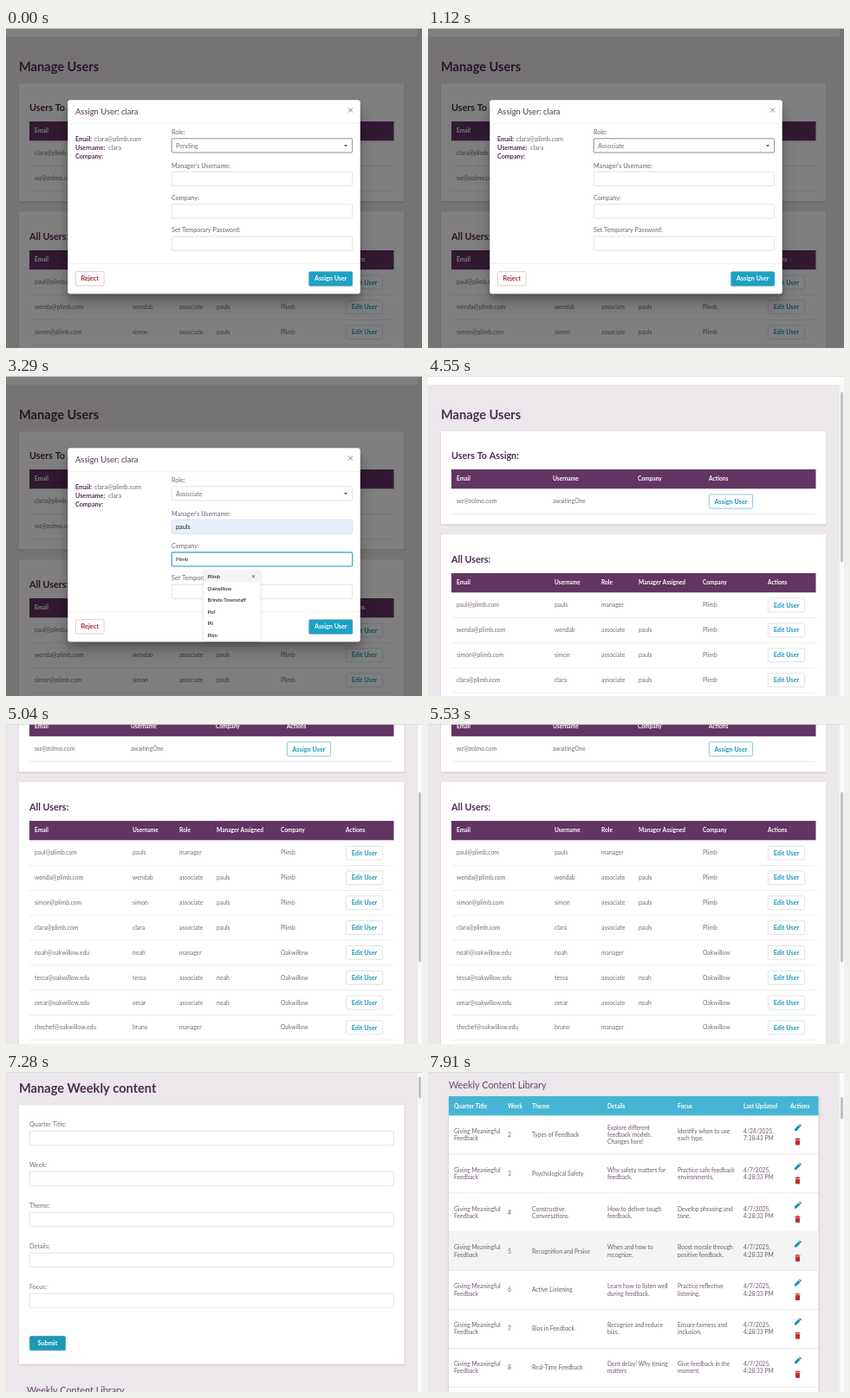
An HTML page with a canvas that plays this animation: 480x370 px, repeating every 8 s.

```html
<!DOCTYPE html>
<html lang="en">
<head>
<meta charset="utf-8">
<title>Manage Users</title>
<style>
html, body { margin: 0; width: 100%; height: 100%; overflow: hidden; background: #ebe7ea; }
canvas { display: block; width: 480px; height: 370px; }
</style>
</head>
<body>
<canvas id="stage"></canvas>
<script>
const W = 480, H = 370, LOOP = 8000;
const canvas = document.getElementById('stage');
const ctx = canvas.getContext('2d');
const dpr = Math.max(1, window.devicePixelRatio || 1);
canvas.width = W * dpr;
canvas.height = H * dpr;

const PINK = '#ebe7ea', PURPLE = '#623562', DARK = '#4f2c51', GRAY = '#786b78';
const TEAL = '#1f98b8', SOFT_TEAL = '#69b7cc', LINE = '#e9e6e9', AUTOFILL = '#e8f0fe';

const pending = [
  ['clara@plimb.com', 'clara', ''],
  ['wz@zolmo.com', 'awaitingOne', '']
];
const users = [
  ['paul@plimb.com', 'pauls', 'manager', '', 'Plimb'],
  ['wenda@plimb.com', 'wendab', 'associate', 'pauls', 'Plimb'],
  ['simon@plimb.com', 'simon', 'associate', 'pauls', 'Plimb'],
  ['clara@plimb.com', 'clara', 'associate', 'pauls', 'Plimb'],
  ['noah@oakwillow.edu', 'noah', 'manager', '', 'Oakwillow'],
  ['tessa@oakwillow.edu', 'tessa', 'associate', 'noah', 'Oakwillow'],
  ['omar@oakwillow.edu', 'omar', 'associate', 'noah', 'Oakwillow'],
  ['thechef@oakwillow.edu', 'bruno', 'manager', '', 'Oakwillow']
];
const managers = ['pauls', 'noah', 'blueberry', 'melodia', 'joannet', 'adas'];
const companies = ['Plimb', 'Oakwillow', 'Brindo Townstaff', 'Pof', 'Pli', 'Plim'];
const lessons = [
  ['Types of Feedback', 'Explore different|feedback models.|Changes here!', 'Identify when to use|each type.'],
  ['Psychological Safety', 'Why safety matters for|feedback.', 'Practice safe feedback|environments.'],
  ['Constructive|Conversations', 'How to deliver tough|feedback.', 'Develop phrasing and|tone.'],
  ['Recognition and Praise', 'When and how to|recognize.', 'Boost morale through|positive feedback.'],
  ['Active Listening', 'Learn how to listen well|during feedback.', 'Practice reflective|listening.'],
  ['Bias in Feedback', 'Recognize and reduce|bias.', 'Ensure fairness and|inclusion.'],
  ['Real-Time Feedback', 'Dont delay! Why timing|matters', 'Give feedback in the|moment.']
];

const span = (t, a, b) => Math.min(1, Math.max(0, (t - a) / (b - a)));
const easeOut = p => 1 - (1 - p) ** 3;
const easeInOut = p => p * p * (3 - 2 * p);

function rect(x, y, w, h, color) {
  ctx.fillStyle = color;
  ctx.fillRect(x, y, w, h);
}

function box(x, y, w, h, r, fill, stroke, lineWidth = 0.7) {
  ctx.beginPath();
  ctx.roundRect(x, y, w, h, r);
  if (fill) { ctx.fillStyle = fill; ctx.fill(); }
  if (stroke) { ctx.strokeStyle = stroke; ctx.lineWidth = lineWidth; ctx.stroke(); }
}

// y is the visual middle of the line
function text(str, x, y, size, color, weight = 400, align = 'left') {
  ctx.font = `${weight} ${size}px Lato, sans-serif`;
  ctx.textAlign = align;
  ctx.fillStyle = color;
  ctx.fillText(str, x, y + size * 0.36);
}

function lines(str, x, y, size, color) {
  const parts = str.split('|');
  parts.forEach((s, i) => text(s, x, y + (i - (parts.length - 1) / 2) * 8.4, size, color));
}

function shadowed(blur, dy, alpha, draw) {
  ctx.save();
  ctx.shadowColor = `rgba(0,0,0,${alpha})`;
  ctx.shadowBlur = blur * dpr;
  ctx.shadowOffsetY = dy * dpr;
  draw();
  ctx.restore();
}

function card(y, h) {
  shadowed(1.5, 0.8, 0.2, () => box(15, y, 444.5, h, 1, '#fff'));
}

function button(label, x, y, w, h, color, border, fill = '#fff') {
  box(x + 0.4, y + 0.4, w - 0.8, h - 0.8, 1.5, fill, border);
  text(label, x + w / 2, y + h / 2, 7.3, color, 700, 'center');
}

function cross(x, y, r, color) {
  ctx.strokeStyle = color;
  ctx.lineWidth = 0.8;
  ctx.beginPath();
  ctx.moveTo(x - r, y - r); ctx.lineTo(x + r, y + r);
  ctx.moveTo(x + r, y - r); ctx.lineTo(x - r, y + r);
  ctx.stroke();
}

function tableHead(y, labels, xs) {
  rect(27, y, 420.5, 22.3, PURPLE);
  labels.forEach((s, i) => text(s, xs[i], y + 11, 6.6, '#fff', 700));
}

function navBar(active) {
  rect(0, 0, 475, 42, '#fff');
  ctx.fillStyle = '#c9b24b';
  ctx.beginPath();
  ctx.arc(43, 21, 9.5, 0, Math.PI * 2);
  ctx.fill();
  const links = ['Manage Users', 'Manage Weekly content', 'Pair Assignments', "Lou's Account"];
  [175, 230, 314, 376].forEach((x, i) => {
    const on = i === active;
    text(links[i], x, 21.5, 7.2, on ? TEAL : SOFT_TEAL, on ? 700 : 400);
    if (on) rect(x, 25.2, ctx.measureText(links[i]).width, 0.7, TEAL);
  });
  button('Log Out', 428, 13, 39, 17, TEAL, '#c3dce3');
}

function usersPage(assigned) {
  navBar(0);
  text('Manage Users', 15, 76.3, 14.6, DARK, 700);

  const queue = assigned ? pending.slice(1) : pending;
  card(96, 78.5 + 29 * queue.length);
  text('Users To Assign:', 27, 123.7, 10.8, DARK, 700);
  const queueX = [33, 144, 242, 324];
  tableHead(140, ['Email', 'Username', 'Company', 'Actions'], queueX);
  queue.forEach((row, i) => {
    const y = 177 + 29 * i;
    row.forEach((s, c) => text(s, queueX[c], y, 6.8, GRAY));
    button('Assign User', 324, y - 8.5, 51, 17, TEAL, '#55b4cb');
    rect(27, y + 14.2, 420.5, 0.7, LINE);
  });

  const top = 186 + 29 * queue.length;
  card(top, 480);
  text('All Users:', 27, top + 28.7, 10.8, DARK, 700);
  const userX = [33, 146, 200, 243, 317, 392];
  tableHead(top + 45, ['Email', 'Username', 'Role', 'Manager Assigned', 'Company', 'Actions'], userX);
  users.filter(u => assigned || u[1] !== 'clara').forEach((row, i) => {
    const y = top + 82 + 28.85 * i;
    row.forEach((s, c) => text(s, userX[c], y, 6.8, GRAY));
    button('Edit User', 392, y - 8.3, 43, 16.6, TEAL, '#c8dde2');
    rect(27, y + 14.2, 420.5, 0.7, LINE);
  });
}

function pencil(x, y) {
  ctx.save();
  ctx.translate(x, y);
  ctx.rotate(Math.PI / 4);
  ctx.fillStyle = '#1b93b1';
  ctx.beginPath();
  ctx.moveTo(-1.5, -2.9); ctx.lineTo(1.5, -2.9); ctx.lineTo(1.5, 3.2);
  ctx.lineTo(0, 5.2); ctx.lineTo(-1.5, 3.2);
  ctx.fill();
  box(-1.5, -5, 3, 1.5, 0.5, '#1b93b1');
  ctx.restore();
}

function trash(x, y) {
  const red = '#bd2f2f';
  rect(x - 3, y - 3.6, 6, 1.1, red);
  rect(x - 1.2, y - 4.2, 2.4, 0.8, red);
  box(x - 2.5, y - 2, 5, 6, 0.8, red);
}

function weeklyPage(hover) {
  navBar(1);
  text('Manage Weekly content', 15, 76.3, 14.6, DARK, 700);
  card(96, 300);
  ['Quarter Title:', 'Week:', 'Theme:', 'Details:', 'Focus:'].forEach((s, i) => {
    const y = 118 + 47 * i;
    text(s, 27, y, 7.2, GRAY);
    box(27.4, y + 8, 420, 16.5, 1.5, '#fff', '#d9d7da');
  });
  button('Submit', 27, 363, 42, 17, '#fff', TEAL, TEAL);

  text('Weekly Content Library', 24, 425.5, 10.8, '#664768');
  shadowed(2, 0.8, 0.2, () => rect(24, 438, 426.5, 700, '#fff'));
  rect(24, 438, 426.5, 22.3, '#45b5d3');
  const xs = [30, 92, 120, 207, 288, 364, 418];
  ['Quarter Title', 'Week', 'Theme', 'Details', 'Focus', 'Last Updated', 'Actions']
    .forEach((s, i) => text(s, xs[i], 449.2, 6.6, '#fff', 700));
  lessons.forEach(([theme, details, focus], i) => {
    const y = 482.6 + 44.85 * i;
    if (hover && i === 3) rect(24, y - 22.4, 426.5, 44.8, '#f4f4f5');
    const date = i ? '4/7/2025,|4:28:33 PM' : '4/24/2025,|7:38:43 PM';
    ['Giving Meaningful|Feedback', String(i + 2), theme, details, focus, date]
      .forEach((s, c) => lines(s, xs[c], y, 6.7, '#705b70'));
    pencil(426.5, y - 8);
    trash(426.5, y + 8);
    rect(24, y + 22.1, 426.5, 0.7, '#e2dfe2');
  });
}

function scrollbar(y, length) {
  rect(475, 0, 5, H, '#fafafa');
  box(476, y, 3, length, 1.5, '#c1c1c3');
}

function field(label, y, { value = '', size = 7.3, fill = '#fff', focus = 0, color = '#55505a' } = {}) {
  text(label, 191, y - 7, 7.2, '#6d606e');
  box(191.2, y + 0.2, 208.4, 16.2, 1.5, fill, '#d9d7da');
  if (focus) {
    ctx.save();
    ctx.globalAlpha *= focus;
    box(191.2, y + 0.2, 208.4, 16.2, 1.5, null, '#2ba9c5', 1.2);
    ctx.restore();
  }
  text(value, 196, y + 8.4, size, color);
}

function suggestions(items, y, w, h, hover) {
  shadowed(3, 0.8, 0.2, () => box(228, y, w, h, 1.5, '#fff'));
  if (hover) {
    rect(228, y, w, 13.8, '#f4f4f4');
    cross(228 + w - 8, y + 7, 1.6, '#444');
  }
  items.forEach((s, i) => text(s, 232.5, y + 7.2 + 13.5 * i, 5.9, '#2c2a2e', 600));
}

function modal(t) {
  const paper = () => box(71.5, 83.5, 337, 223.7, 2, '#fff');
  shadowed(18, 11, 0.2, paper);
  shadowed(7, 5, 0.2, paper);
  text('Assign User: clara', 80, 97, 9.4, '#553557');
  cross(397.5, 95, 2.5, '#666');
  rect(71.5, 110, 337, 0.6, '#e8e6e8');
  rect(71.5, 272, 337, 0.6, '#e8e6e8');

  text('Email:', 80, 128, 7.2, DARK, 700);
  text('clara@plimb.com', 102, 128, 7.3, GRAY);
  text('Username:', 80, 138, 7.2, DARK, 700);
  text('clara', 118, 138, 7.3, GRAY);
  text('Company:', 80, 148, 7.2, DARK, 700);

  field('Role:', 127.6, { value: t < 980 ? 'Pending' : 'Associate', color: GRAY });
  if (t < 1540) box(191.2, 127.8, 208.4, 16.2, 1.5, null, '#77737a');
  ctx.fillStyle = '#666';
  ctx.beginPath();
  ctx.moveTo(389.8, 135); ctx.lineTo(394.2, 135); ctx.lineTo(392, 137.4);
  ctx.fill();

  const managerHover = t >= 1960, managerSet = t >= 2450;
  field("Manager's Username:", 166, {
    value: managerHover ? 'pauls' : '',
    size: managerSet ? 7.3 : 5.8,
    fill: managerHover ? AUTOFILL : '#fff',
    focus: span(t, 1540, 1690) - span(t, 2730, 2880),
    color: '#222'
  });
  const companyHover = t >= 3080, companySet = t >= 3420;
  field('Company:', 203.6, {
    value: companyHover ? 'Plimb' : '',
    size: companySet ? 7.3 : 5.8,
    fill: companySet ? AUTOFILL : '#fff',
    focus: span(t, 2730, 2880) - span(t, 3550, 3700),
    color: '#222'
  });
  const typed = Math.floor(span(t, 3600, 3990) * 8);
  field('Set Temporary Password:', 240.9, {
    value: '•'.repeat(typed),
    focus: span(t, 3550, 3700) - span(t, 4030, 4130),
    color: '#222'
  });

  button('Reject', 80, 281.3, 33.5, 17, '#a92635', '#d5b5ba');
  shadowed(1.5, 0.6, 0.25, () => box(349.5, 281.6, 50.4, 16.7, 1.5, t > 4030 ? '#178eae' : '#1ca2c5'));
  text('Assign User', 374.7, 289.8, 7.2, '#fff', 700, 'center');

  if (t >= 1680 && !managerSet) suggestions(managers, 187.3, 58, 83, managerHover);
  if (t >= 2870 && !companySet) suggestions(companies, 224.7, 65.5, 82.3, companyHover);
}

function scrolled(offset, draw) {
  ctx.save();
  ctx.translate(0, -offset);
  draw();
  ctx.restore();
}

function render(t) {
  ctx.setTransform(dpr, 0, 0, dpr, 0, 0);
  ctx.globalAlpha = 1;
  rect(0, 0, W, H, PINK);
  if (t < 6510) {
    const offset = 32 + 116 * easeOut(span(t, 4590, 5060)) - 148 * easeInOut(span(t, 5540, 6110));
    scrolled(offset, () => usersPage(t >= 4280));
    if (t >= 4350) scrollbar(1.5 + offset * 0.52, 197);
  } else {
    const offset = 410 * easeInOut(span(t, 7170, 7640));
    scrolled(offset, () => weeklyPage(t >= 7600));
    scrollbar(1.5 + offset * 0.067, 25.5);
  }

  const dialog = 1 - easeInOut(span(t, 4150, 4350));
  if (dialog > 0) {
    ctx.globalAlpha = dialog;
    rect(0, 0, W, H, 'rgba(0,0,0,0.5)');
    modal(t);
    ctx.globalAlpha = 1;
  }
  rect(0, 0, W, 0.8, '#dcdadc');
}

const start = performance.now();
function tick(now) {
  render(Math.max(0, now - start) % LOOP);
  requestAnimationFrame(tick);
}
render(0);
requestAnimationFrame(tick);
</script>
</body>
</html>
```
